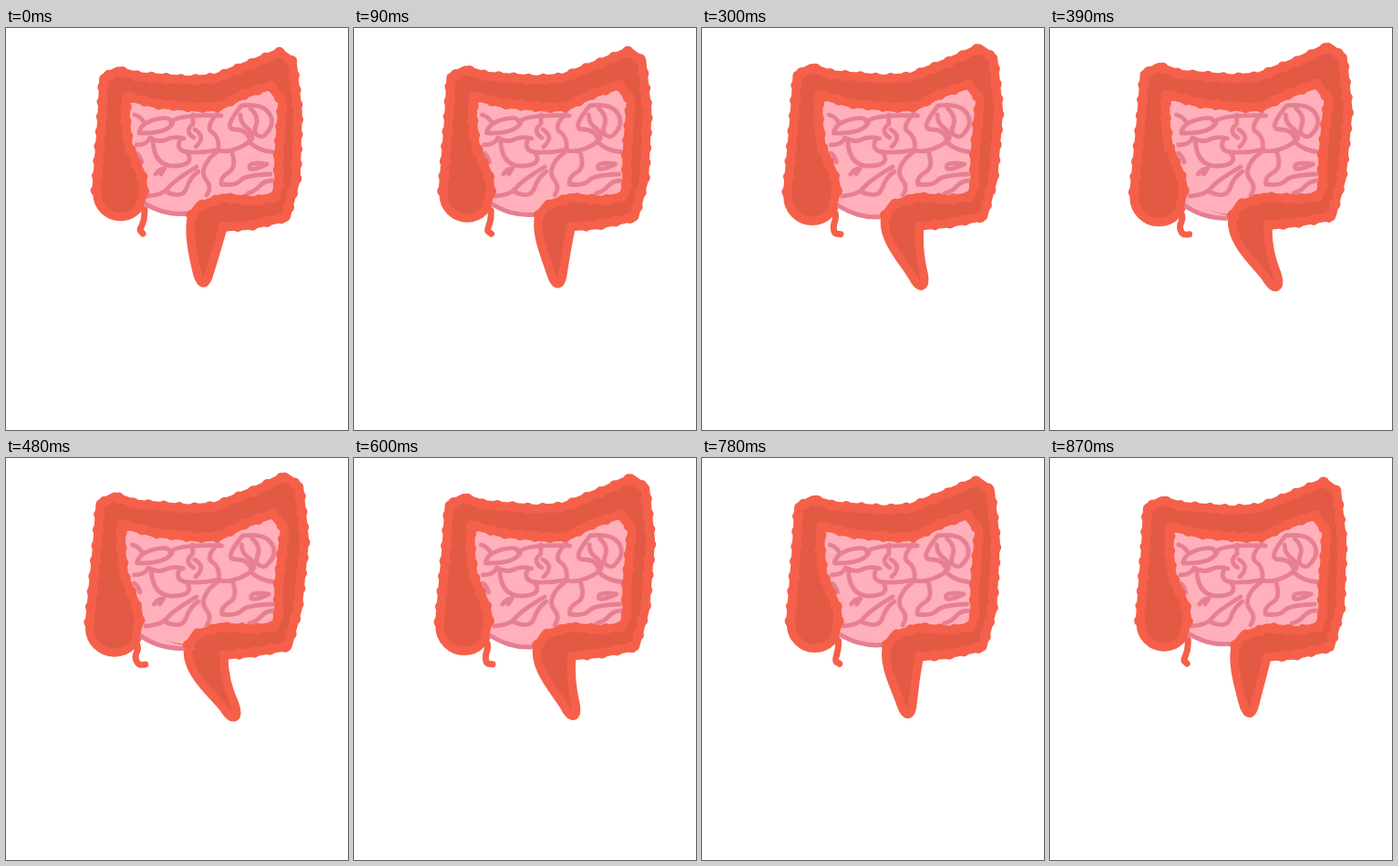
These frames come from a looping animation (375 px wide and 440 px high, 900 ms). An HTML page without scripts:

```html
<!DOCTYPE html>
<html lang="en">
<head>
<meta charset="utf-8">
<title>Intestine</title>
<style>
  html, body { margin: 0; width: 100%; height: 100%; overflow: hidden; background: #fff; }
  svg { display: block; width: 375px; height: 440px; }

  svg * { animation: .45s linear infinite alternate; }
  path { fill: none; stroke-linecap: round; stroke-linejoin: round; }
  .colon { fill: #e25944; stroke: #f5604a; stroke-width: 9.5px; }
  .pink { fill: #ffb0bb; }
  .edge { stroke: #f5604a; stroke-width: 9.5px; }
  /* evenly spaced round dots make the scalloped wall */
  .bumps { stroke: #f5604a; stroke-width: 12.5px; stroke-dasharray: 0 1; }
  .appendix { animation-name: appendix; stroke: #f5604a; stroke-width: 7px; }
  .belly { animation-name: belly; stroke: #e67f91; stroke-width: 5px; }
  .veins { animation-name: veins; transform-origin: 215px 140px; stroke: #e67f91; stroke-width: 4.8px; }
  .cecum { animation-name: cecum; }
  .wall { animation-name: wall; }
  .tail { animation-name: tail; }
  .rim { animation-name: rim; }

  @keyframes cecum {
    from { cx: 125.5px; cy: 181px; r: 25.5px; }
    to { cx: 118.5px; cy: 186px; r: 27.5px; }
  }
  @keyframes wall {
    from { d: path("M99 178L105 100 107 55 123 47 145 53 200 57 229 55 270 39 300 27 314 37 320 92 318 165 307 207 268 216 238 218"); }
    to { d: path("M91 180L99 100 103 50 119 42 141 50 200 55 229 53 272 36 306 20 322 31 328 90 320 165 309 206 268 213 239 216"); }
  }
  @keyframes tail {
    from { d: path("M238 218C234 232 229 250 223 268C219 283 213 283 209 266S199 222 204 205"); }
    to { d: path("M239 216C239 235 243 251 253 270C259 286 251 289 242 276S193 235 200 205"); }
  }
  @keyframes rim {
    from { d: path("M204 205L212 195 238 186 273 189 295 185 299 172 299 140 302 100 303 80 290 63 262 72 233 86 212 87 165 83 132 75 131 100 134 128 149 162 151 180 146 194"); }
    to { d: path("M200 205L208 193 235 185 273 187 295 184 299 171 299 140 303 100 306 77 293 61 264 71 233 86 212 87 164 82 126 72 126 100 129 128 143 163 146 177 142 194"); }
  }
  @keyframes belly {
    from { d: path("M150 191C162 198 180 207 206 202"); }
    to { d: path("M146 194C158 202 176 212 204 208"); }
  }
  @keyframes appendix {
    from { d: path("M152 199C151 208 153 208 149 216S148 221 150 225"); }
    to { d: path("M143 204C147 212 139 214 142 221S148 227 153 226"); }
  }
  @keyframes veins {
    from { transform: none; }
    to { transform: scale(1.035, 1); }
  }
</style>
</head>
<body>
<svg viewBox="0 0 375 440">
  <path class="appendix"/>
  <circle class="colon cecum"/>
  <path class="colon wall"/>
  <path class="bumps wall" pathLength="36"/>
  <path class="colon tail"/>
  <path class="pink rim"/>
  <path class="pink belly"/>
  <g class="veins">
    <!-- upper left -->
    <path d="M141 95q7 2 10 8M146 114q2-10 18-14t17 3M146 115q30 1 37-11"/>
    <path d="M181 103q9-9 55-7M143 128q12 0 15-8q10 6 18 2t19-1"/>
    <path d="M205 95v10q-10 8 1 15M207 111q13 8 1 19M161 124q2 28 24 27t14-14"/>
    <path d="M191 122q-6 13 10 14t32-3q1-14-7-19t6-21"/>
    <!-- upper right -->
    <path d="M233 134q14 4 35-10q-3-13-17-13t7-26q24-3 31 9t-6 24"/>
    <path d="M257 95q0 9 7 14t6 12M268 88q10 9 6 19t6 12M266 124q11 11 28 12"/>
    <!-- lower right -->
    <path d="M248 137q5 16-4 21t-8 13q16 2 21-4t33-7"/>
    <path d="M286 149q-19 9-19 3t19-3M292 167q-9 0-14 6t-13 8"/>
    <!-- lower left -->
    <path d="M143 137q4 3 6 10M164 160q4-6 10-6l-4 6M155 184q17-1 23-9t31-23"/>
    <path d="M177 180q17 7 21-5t13-18M218 151q-4 9 2 16t0 16M218 151q4-9 13-15"/>
  </g>
  <path class="edge rim"/>
  <path class="bumps rim" pathLength="32"/>
</svg>
</body>
</html>
```
